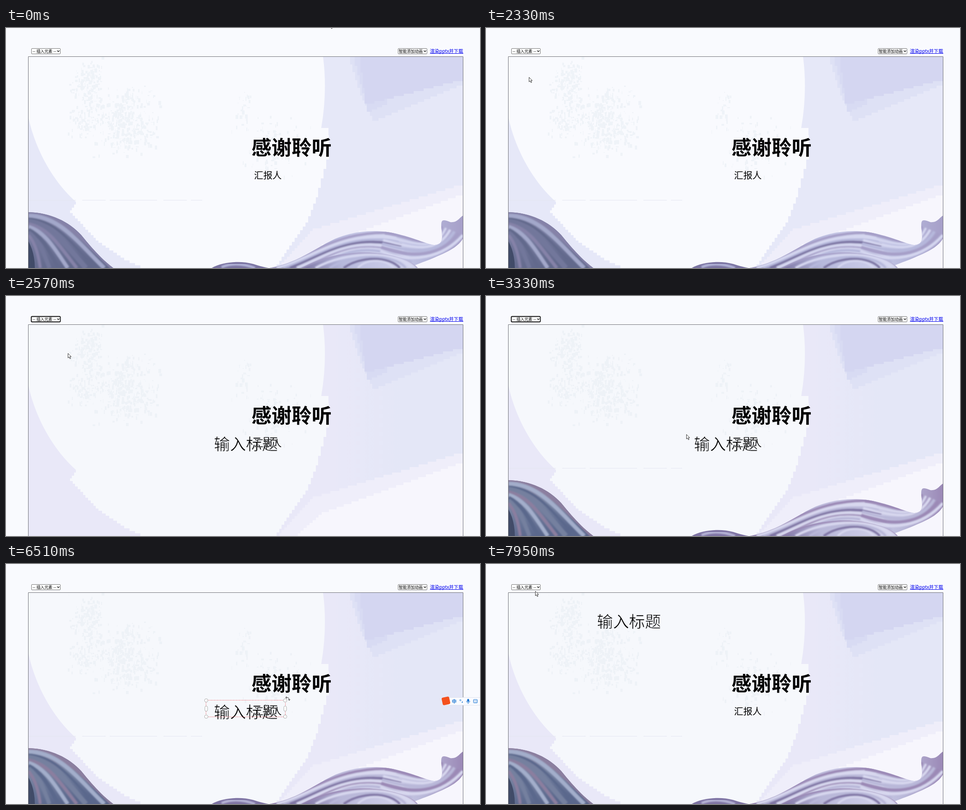
Recreate the animation shown at these times as an HTML page. Size 1051 by 533 pixels, loop 7.99 s.

```html
<!DOCTYPE html>
<html lang="zh-CN">
<head>
<meta charset="utf-8">
<style>
html, body { margin: 0; width: 100%; height: 100%; overflow: hidden; background: #f9fafe; }
svg {
  display: block; width: 1051px; height: 533px;
  font-family: "Liberation Sans", "Noto Sans CJK SC", "Noto Sans CJK", sans-serif;
  --moon: #f6f8fc; --lav: #e9e8f8; --far: #e4e7f7; --spot: #eef2f7;
  --shade: #5a678c; --body: #74809f; --top: #8b7e9f; --light: #a3aecb;
  --deep: #7f74a4; --silk: #b9b8d9; --pale: #d8d8ef; --curl: #9b89b6;
}
svg.early {
  --moon: #f9fafe; --lav: #e6e8f8; --far: #e6e8f8; --spot: #eff3f8;
  --shade: #62698c; --body: #72779b; --top: #8582a8; --light: #a3a8ca;
  --deep: #7c75a3; --silk: #b6b8dc; --pale: #d5d7f0; --curl: #a69fc8;
}
.cjk { font-family: "Noto Sans CJK SC", "Noto Sans CJK", sans-serif; }
.ui { font-size: 8.89px; }
.folds { fill: none; filter: url(#soft); }
#menu { filter: drop-shadow(0 1px 2px #0006); }
</style>
</head>
<body>
<svg id="stage" viewBox="0 0 1051 533">
  <defs>
    <clipPath id="slide"><path d="M50 64H1013V533H50Z"/></clipPath>
    <clipPath id="leftClip"><use href="#leftShape"/></clipPath>
    <clipPath id="rightClip"><use href="#rightShape"/></clipPath>
    <clipPath id="frontClip"><use href="#frontShape"/></clipPath>
    <filter id="soft"><feGaussianBlur stdDeviation="1.8"/></filter>
    <linearGradient id="sky"><stop offset=".7" stop-color="var(--lav)"/><stop offset=".86" stop-color="var(--far)"/></linearGradient>
    <linearGradient id="leftFill" x2=".35" y2="1"><stop stop-color="var(--top)"/><stop offset=".5" stop-color="var(--body)"/><stop offset="1" stop-color="var(--shade)"/></linearGradient>
    <linearGradient id="rightFill"><stop stop-color="var(--deep)"/><stop offset=".3" stop-color="var(--silk)"/><stop offset=".55" stop-color="var(--pale)"/><stop offset=".8" stop-color="var(--silk)"/><stop offset="1" stop-color="var(--curl)"/></linearGradient>
    <linearGradient id="frontFill"><stop stop-color="var(--deep)"/><stop offset=".35" stop-color="var(--silk)"/><stop offset="1" stop-color="var(--pale)"/></linearGradient>
    <path id="leftShape" d="M50 409C98 410 140 430 167 460C190 488 210 512 238 533H50Z"/>
    <path id="rightShape" d="M585 533C650 520 680 492 730 468C780 447 830 448 870 458C910 468 935 481 950 482C968 480 968 470 966 450C963 424 967 424 985 431C1001 433 1006 420 1013 417V468C1000 490 970 501 945 512C925 520 908 526 890 533Z"/>
    <path id="frontShape" d="M655 533C710 503 780 490 845 503C885 511 905 522 913 533Z"/>
  </defs>

  <g clip-path="url(#slide)">
    <path fill="url(#sky)" d="M50 64H1013V533H50Z"/>
    <path id="dusk2" fill="#dee1f5"/>
    <path id="dusk1" fill="#d8dbf3"/>
    <path id="dusk0" fill="#d4d6f1"/>
    <path id="glow0" fill="#efeefa"/>
    <path id="glow1" fill="#f7f6fd"/>
    <path id="moon" fill="var(--moon)"/>
    <path id="spots" fill="var(--spot)"/>
    <g id="cloth">
      <path d="M50 382.5H435" stroke="#e4e6f1" stroke-dasharray="105 14 52 9"/>
      <use href="#leftShape" fill="url(#leftFill)"/>
      <g clip-path="url(#leftClip)">
        <g id="leftFolds" class="folds"/>
        <path d="M50 474Q64 500 64 533H50Z" fill="#414b68"/>
      </g>
      <path d="M456 533C480 519 520 516 548 524Q566 530 582 533Z" fill="var(--deep)"/>
      <path class="folds" d="M478 531C500 522 525 523 552 533" stroke="var(--silk)" stroke-width="5"/>
      <use href="#rightShape" fill="url(#rightFill)"/>
      <g clip-path="url(#rightClip)">
        <g id="rightFolds" class="folds"/>
        <g id="ribbonFolds" class="folds"/>
      </g>
      <use href="#frontShape" fill="url(#frontFill)"/>
      <g clip-path="url(#frontClip)"><g id="frontFolds" class="folds"/></g>
    </g>
  </g>
  <path d="M49.5 533V63.5H1013.5V533" fill="none" stroke="#707177"/>

  <g class="ui">
    <g fill="#fff" stroke="#767676">
      <rect x="56.5" y="45.5" width="64" height="12" rx="1.5"/>
      <rect x="869.5" y="45.5" width="64" height="12" rx="1.5"/>
      <path d="M113.5 50l2.5 2.6l2.5 -2.6M926.5 50l2.5 2.6l2.5 -2.6" fill="none" stroke="#111" stroke-width="1.3"/>
    </g>
    <rect id="ring" x="56" y="45.5" width="64.5" height="12" rx="2" fill="none" stroke="#101010" stroke-width="1.8"/>
    <text x="59" y="54.5">-- 插入元素 --</text>
    <text x="871" y="54.5">智能添加动画</text>
  </g>
  <text class="cjk" x="940" y="54.5" font-size="10.4" fill="#00e">渲染pptx并下载</text>
  <path d="M940 56.5H1014" stroke="#00e"/>
  <text class="cjk" x="544.3" y="282" font-size="44.5" font-weight="700">感谢聆听</text>
  <text class="cjk" x="550" y="334.5" font-size="20.4">汇报人</text>

  <g id="title">
    <text class="cjk" x="461" y="341.5" font-size="35.5" font-weight="300" stroke="var(--moon)" stroke-width=".7">输入标题</text>
    <g id="frame" fill="none">
      <rect x="443.5" y="302.5" width="176" height="37" stroke="#ee6b70" stroke-dasharray="2 1.5"/>
      <g fill="#fff" stroke="#999" stroke-width=".8">
        <circle cx="444" cy="303" r="3.8"/><circle cx="619" cy="303" r="3.8"/>
        <circle cx="444" cy="339" r="3.8"/><circle cx="619" cy="339" r="3.8"/>
        <rect x="441" y="315.5" width="6" height="11.5" rx="3"/><rect x="616" y="315.5" width="6" height="11.5" rx="3"/>
      </g>
      <path d="M621 296.5Q628 295.5 628 302M622.5 294L620 296.5L622.8 299M626 300.5L628 303L630 300.5" stroke="#222"/>
    </g>
    <path id="caret" d="M601.5 311V347" stroke="#111"/>
  </g>

  <g id="ime">
    <rect x="975" y="296.5" width="84" height="17" rx="3" fill="#fafbff" stroke="#dfe3ee"/>
    <rect x="967" y="295.5" width="17" height="17" rx="3" fill="#f4511e" transform="rotate(-12 975.5 304)"/>
    <g fill="none" stroke="#1673d1">
      <text class="cjk" x="988.5" y="308.5" font-size="10.5" font-weight="700" fill="#1673d1" stroke="none">中</text>
      <circle cx="1007.5" cy="302.5" r="1.5"/><path d="M1012 305.5V306.5L1011 308" stroke-width="1.8"/>
      <rect x="1023" y="300" width="3.5" height="6" rx="1.7" fill="#1673d1"/>
      <path d="M1021 304C1021 309.500 1028.500 309.500 1028.500 304M1024.700 308V310.500"/>
      <rect x="1036.5" y="301" width="8.5" height="7.5" rx="1"/><path d="M1038 303.5H1044M1038 306.5H1044" stroke-dasharray="1.3 1"/>
    </g>
  </g>

  <g id="menu" class="ui">
    <rect x="56.5" y="58" width="64" height="180.4" fill="#fff" stroke="#8a8a8a" stroke-width=".7"/>
    <rect id="hover" x="57" width="63" height="16.4" fill="#1967d2"/>
  </g>

  <g id="pointer">
    <path id="arrow" d="M.5 .5V10.5L2.900 8.400L4.700 12.300L6.300 11.600L4.600 7.800H7.700Z" fill="#fff" stroke="#222" stroke-width=".9"/>
    <path id="beam" d="M-2.500 -7H2.500M0 -7V7M-2.500 7H2.500" fill="none" stroke="#333"/>
  </g>
</svg>
<script>
const LOOP = 7990, ROW = 16.4, MENU_TOP = 58, BLINK = 500;
const el = id => document.getElementById(id);
const show = (id, on) => { el(id).style.display = on ? '' : 'none'; };
const place = (id, [x, y]) => el(id).setAttribute('transform', `translate(${Math.round(x)} ${Math.round(y)})`);
const mix = (a, b, p) => a.map((v, i) => v + (b[i] - v) * p);
function add(parent, tag, attrs) {
  const node = document.createElementNS('http://www.w3.org/2000/svg', tag);
  for (const name in attrs) node.setAttribute(name, attrs[name]);
  return el(parent).appendChild(node);
}
let seed = 11;
const rand = () => (seed = seed * 16807 % 2147483647) / 2147483647;
const spread = () => rand() + rand() - 1;

// Blocky outline through a few points
function stairs(points, step = 6) {
  return points.slice(1).map((end, i) => {
    const start = points[i];
    const n = Math.ceil(Math.min(...end.map((v, j) => Math.abs(v - start[j]))) / step) || 1;
    return Array.from({ length: n }, (_, k) => {
      const [x, y] = mix(start, end, (k + 1) / n).map(Math.round);
      return `H${x}V${y}`;
    }).join('');
  }).join('');
}
const block = (id, points, close) =>
  el(id).setAttribute('d', `M${points[0]}${stairs(points)}${close}`);

block('dusk2', [[757, 64], [785, 150], [812, 206], [1013, 122]], 'V64Z');
block('dusk1', [[768, 64], [800, 186], [845, 166]], 'V64Z');
block('dusk0', [[782, 64], [795, 168], [1013, 112]], 'V64Z');
block('glow0', [[600, 533], [680, 445], [1013, 344]], 'V533Z');
block('glow1', [[640, 533], [700, 480], [1013, 366]], 'V533Z');
el('moon').setAttribute('d', 'M50 64H703Q713 140 699 222H715V238'
  + stairs([[715, 238], [716, 292], [692, 376], [670, 432], [628, 492], [600, 533]])
  + 'H310' + stairs([[310, 533], [262, 510], [205, 472], [142, 405], [155, 386]])
  + 'C105 342 65 270 50 200Z');

// Clusters of faint streaks: centre and radii
const streaks = [[180, 120, 45, 58], [170, 205, 34, 42], [265, 205, 78, 85], [525, 190, 28, 55], [600, 260, 85, 70]]
  .flatMap(([cx, cy, rx, ry], i) => Array.from({ length: rx * ry / (i < 3 ? 16 : 50) }, () => {
    const w = 1 + Math.floor(rand() * 6), h = 1 + Math.floor(rand() * 9);
    return `M${Math.round(cx + spread() * rx)} ${Math.round(cy + spread() * ry)}h${w}v${h}h${-w}z`;
  }));
el('spots').setAttribute('d', streaks.join(''));

// Soft folds swept from one curve to another
function folds(id, from, to, count, colors, width) {
  for (let i = 0; i < count; i++) {
    const [x, y, ...rest] = mix(from, to, i / (count - 1));
    add(id, 'path', {
      d: `M${x} ${y}C${rest}`,
      stroke: `var(--${colors[i % colors.length]})`,
      'stroke-width': width * (.5 + rand())
    });
  }
}
folds('leftFolds', [50, 411, 125, 408, 170, 470, 238, 533], [50, 460, 66, 480, 72, 505, 76, 533],
  9, ['top', 'light', 'shade', 'body'], 8);
folds('rightFolds', [585, 533, 680, 510, 730, 448, 860, 455], [690, 533, 740, 500, 800, 470, 900, 520],
  8, ['curl', 'pale', 'silk', 'deep', 'pale'], 5);
folds('ribbonFolds', [840, 455, 900, 462, 945, 500, 966, 440], [830, 495, 900, 525, 970, 510, 1013, 460],
  6, ['curl', 'pale', 'pale', 'silk'], 7);
folds('frontFolds', [655, 533, 740, 488, 880, 488, 913, 533], [780, 533, 800, 512, 840, 512, 860, 533],
  5, ['curl', 'pale', 'silk', 'deep', 'pale'], 4);

const options = '-- 插入元素 --,图片,文本,标题,形状,表格,图表,视频,音频,公式,图标'.split(',').map((label, i) => {
  const text = add('menu', 'text', { x: 59, y: MENU_TOP + i * ROW + 11.4 });
  text.textContent = label;
  return text;
});

// Each move: begin, end, x, y
const pointerMoves = [
  [120, 800, 88, 57], [1000, 1760, 93, 95], [1800, 1880, 95, 109], [2370, 2570, 137, 127],
  [2810, 3570, 501, 341], [3610, 4250, 558, 321], [4410, 4530, 569, 321], [4860, 5020, 576, 320],
  [6430, 6670, 571, 303], [6670, 7070, 380, 157], [7070, 7190, 356, 102],
  [7230, 7510, 185, 158], [7670, 7950, 109, 60]
];
const titleMoves = [[6670, 7070, -179, -103], [7070, 7210, -215, -201]];
const easeOut = p => 1 - (1 - p) ** 1.6;
const follow = (moves, start, t) => moves.reduce((pos, [begin, end, ...target]) =>
  mix(pos, target, easeOut(Math.min(1, Math.max(0, (t - begin) / (end - begin))))), start);

const origin = performance.now();
function draw() {
  const t = (performance.now() - origin) % LOOP;
  const within = (from, to) => t >= from && t < to;
  const pointer = follow(pointerMoves, [717, -11], t);
  place('pointer', pointer);
  place('title', follow(titleMoves, [0, 0], t));

  el('stage').classList.toggle('early', t < 2530);
  show('cloth', !within(2530, 2610));
  show('title', t >= 2530);
  show('ring', within(2370, 3650));
  show('frame', within(3650, 6690) || within(7230, 7670));
  show('ime', within(3930, 6710));
  show('caret', within(3930, 6690) && Math.floor((t - 3930) / BLINK) % 2 === 0);
  const typing = within(3930, 6510);
  show('beam', typing);
  show('arrow', !typing);

  show('menu', within(1000, 2330));
  const row = Math.max(0, Math.floor((pointer[1] - MENU_TOP) / ROW));
  el('hover').setAttribute('y', MENU_TOP + row * ROW);
  options.forEach((text, i) => text.setAttribute('fill', i === row ? '#fff' : '#000'));
  requestAnimationFrame(draw);
}
draw();
</script>
</body>
</html>
```
